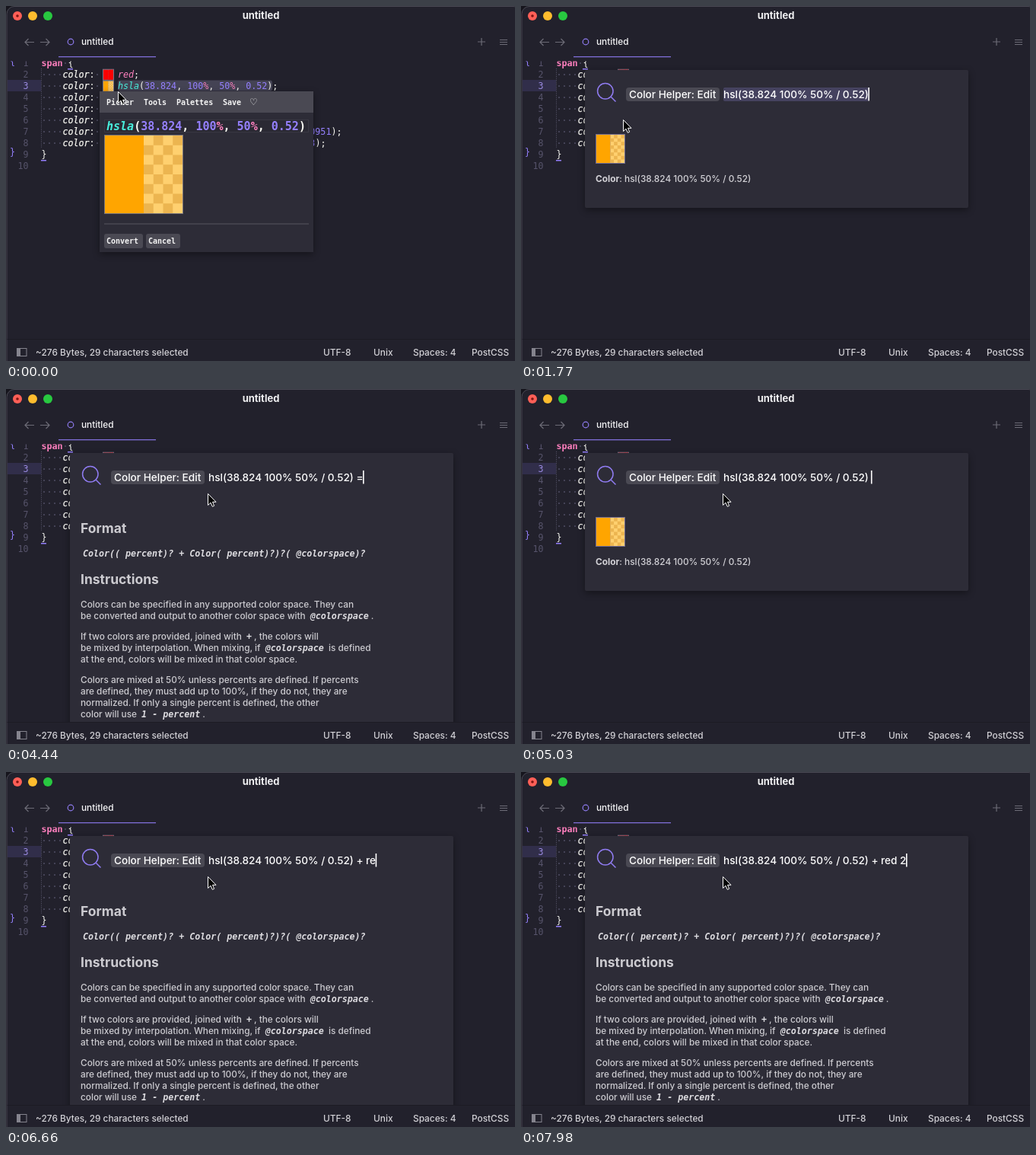
An HTML page that plays this animation: 669 px wide and 466 px high, repeating every 8000 ms.

```html
<!DOCTYPE html>
<html lang="en">
<head>
<meta charset="utf-8">
<title>Color editor</title>
<style>
  html, body { margin: 0; width: 100%; height: 100%; overflow: hidden; background: #16151d; }
  svg { display: block; width: 669px; height: 466px; }
  text { white-space: pre; font: 500 11.85px Inter, sans-serif; fill: #d2d1d6; }
  .mono, .mono tspan { font-family: "DejaVu Sans Mono", monospace; }
  .code, .num { font-weight: 400; font-size: 11.65px; }
  .code { fill: #f8f8f2; }
  .num { fill: #56536a; text-anchor: end; }
  .dot { fill: #55536a; }
  .fn { fill: #48eedc; font-style: italic; }
  .key { fill: #ff80bf; font-style: italic; }
  .val { fill: #9580ff; }
  .pct, .tag { fill: #ff80bf; }
  .tag { font-weight: 700; }
  .prop { font-style: italic; stroke: #f8f8f2; stroke-width: .25; }
  .menu { font-size: 10px; font-weight: 700; fill: #f4f4f4; }
  .heart { font: 12px "DejaVu Sans", sans-serif; fill: #f4f4f4; }
  .big { font-size: 15px; font-weight: 700; fill: #f8f8f2; }
  .input { font-size: 13.6px; fill: #fff; }
  .head { font-size: 17.5px; font-weight: 700; fill: #cccbd0; }
  .help { font-size: 11.8px; fill: #cccbd0; }
  .help .mono, .format { font-size: 11.65px; font-weight: 700; font-style: italic; fill: #dddce0; }
  .icon { fill: none; stroke: #6c6b76; stroke-width: 1.2; }
  .lens { fill: none; stroke: #8f7bf0; stroke-width: 1.5; }
  .surface { fill: #2d2c37; filter: drop-shadow(0 3px 5px rgba(0, 0, 0, .4)); }
  .raised { fill: #4a4953; }
</style>
</head>
<body>
<svg viewBox="0 0 669 466">
  <defs>
    <clipPath id="view"><rect y="72.5" width="669" height="364.5"/></clipPath>
  </defs>
  <rect x="1" y=".5" width="676" height="480" rx="10" fill="#22212c" stroke="#4a4954"/>

  <circle cx="15" cy="13" r="6" fill="#ff5f57"/>
  <circle cx="15" cy="13" r="1.8" fill="#7d1512"/>
  <circle cx="35" cy="13" r="6" fill="#febc2e"/>
  <circle cx="55" cy="13" r="6" fill="#28c840"/>
  <text x="335" y="17" text-anchor="middle" style="font-size:13px;font-weight:700;fill:#f0f0f2">untitled</text>
  <path class="icon" d="M37 47.500H25M29.500 43L25 47.500l4.500 4.500M45 47.500h12M52.500 43L57 47.500l-4.500 4.500"/>
  <circle cx="85" cy="47" r="3.800" fill="none" stroke="#8f7bf0" stroke-width="1.2"/>
  <text x="99" y="51" style="fill:#f4f4f6">untitled</text>
  <rect x="69" y="66" width="128" height="1.300" fill="#7f6ed6"/>
  <path class="icon" d="M620 47h10M625 42v10M649 44.500h10M649 47.500h10M649 50.500h10"/>

  <g clip-path="url(#view)">
    <g id="editor"></g>
    <g id="colorPopup"></g>
    <g id="toolPopup">
      <rect class="surface" x="123" y="112" width="45" height="57"/>
      <rect class="raised" x="123" y="112" width="45" height="28"/>
      <text class="mono menu" x="132" y="130">Back</text>
      <text class="mono menu" x="132" y="157">Edit</text>
    </g>
    <g id="panel">
      <rect id="sheet" class="surface" x="84" y="84" width="504" height="181" rx="2"/>
      <path class="lens" d="M118.200 119.200L124.500 125.500"/>
      <circle class="lens" cx="110.800" cy="111.800" r="10.200"/>
      <rect class="raised" x="138" y="107" width="123" height="18" rx="4"/>
      <text class="input" x="142" y="121">Color Helper: Edit</text>
      <rect id="selection" x="266" y="107" height="18" rx="2" fill="#45425f"/>
      <text class="input" id="input" x="266" y="121"></text>
      <rect id="caret" y="107" width="1.600" height="17.500" fill="#fff"/>
      <g id="preview">
        <g id="baseSwatch"></g>
        <g id="mixSwatch"></g>
        <text x="98" y="231"><tspan font-weight="700">Color</tspan>: <tspan id="result"></tspan></text>
      </g>
      <g id="help"></g>
    </g>
  </g>

  <rect x="1.500" y="437" width="668" height="1" fill="#1c1b24"/>
  <rect x="14.500" y="449.500" width="12.500" height="10" fill="none" stroke="#85848e"/>
  <rect x="15" y="450" width="4" height="9" fill="#85848e"/>
  <text x="39" y="459">~276 Bytes, 29 characters selected</text>
  <text x="417" y="459">UTF-8</text>
  <text x="483" y="459">Unix</text>
  <text x="535" y="459">Spaces: 4</text>
  <text x="612" y="459">PostCSS</text>

  <path id="pointer" d="M.5 .5V15.500L4 12.200L6.300 17.300L8.600 16.300L6.500 11.300H11Z"
        fill="#000" stroke="#fff" stroke-linejoin="round"/>
</svg>
<script>
const $ = id => document.getElementById(id);
const LOOP = 8000;
const ORANGE = ['#ffa500', '#ffd06f', '#ecb550'];
const MIXED = ['#ff3800', '#ff6c42', '#f1562c'];
const BASE = 'hsl(38.824 100% 50% / 0.52)';
const MIX_RESULT = 'hsl(13.282 100% 50% / 0.76)';
const HSLA = 'hsla(38.824, 100%, 50%, 0.52)';

const span = (cls, s) => `<tspan class="${cls}">${s}</tspan>`;
const text = (cls, x, y, s) => `<text class="${cls}" x="${x}" y="${y}">${s}</text>`;
const rect = (x, y, w, h, extra) => `<rect x="${x}" y="${y}" width="${w}" height="${h}" ${extra}/>`;

// Left half opaque, right half over a checkerboard.
function swatch(x, y, size, [solid, light, dark], border) {
  const inner = size - 2, half = inner / 2, cell = inner / 8;
  let cells = '';
  for (let row = 0; row < 8; row++)
    for (let col = (row + 1) % 2; col < 4; col += 2)
      cells += `M${x + 1 + half + col * cell} ${y + 1 + row * cell}h${cell}v${cell}h${-cell}z`;
  return rect(x, y, size, size, `fill="${border}"`) +
    rect(x + 1, y + 1, half, inner, `fill="${solid}"`) +
    rect(x + 1 + half, y + 1, half, inner, `fill="${light}"`) +
    `<path d="${cells}" fill="${dark}"/>`;
}

function highlight(value) {
  return value.replace(/(#\w+)|([a-z][\w-]*)|([\d.]+)|(%)/g, (s, hex, word, number) =>
    span(hex || number ? 'val' : word ? (word === 'red' ? 'key' : 'fn') : 'pct', s));
}

function buildEditor() {
  const lineY = n => 64 + n * 15;
  const plain = color => [color, color, color];
  const rows = [
    ['red', plain('#f00')],
    [HSLA, ORANGE],
    ['#663399', plain('#639')],
    ['rgb(255 0 0 / 0.5)', ['#f00', '#ff8a8a', '#f06a6a']],
    ['hwb(120 0% 0%)', plain('#0f0')],
    ['color(display-p3 0.91749 0.20029 0.10951)', plain('#ff2016')],
    ['lch(54.291% 106.8390 40.8526 / 0.8833)', ['#f00', '#ff2a2a', '#f52020']]
  ];
  let out = rect(2, 97, 44, 15, 'fill="#312e4a"') +
    rect(147, 97.5, 203, 14, 'rx="3" fill="#444354"') +
    '<path d="M46.500 82V187" stroke="#56546a" stroke-dasharray="1 1.500"/>';
  for (let n = 1; n <= 10; n++)
    out += `<text class="mono num" x="29.500" y="${lineY(n)}" ${n === 3 ? 'style="fill:#9a8ae0"' : ''}>${n}</text>`;
  out += text('mono code', 46.5, lineY(1), span('tag', 'span') + span('dot', '·') + '{');
  rows.forEach(([value, colors], i) => {
    const y = lineY(i + 2);
    out += text('mono code', 46.5, y, span('dot', '····') + span('prop', 'color') + ':' + span('dot', '·')) +
      swatch(127, y - 11.3, 15, colors, '#77758a') +
      text('mono code', 147, y, highlight(value) + ';');
  });
  out += text('mono code', 46.5, lineY(9), '}') +
    rect(81, 82, 7, 1.5, 'fill="#9580ff"') + rect(46, 202, 7, 1.5, 'fill="#9580ff"') +
    text('mono code', 5, 77, span('val', '{')) + text('mono code', 5, 196, span('val', '}'));
  $('editor').innerHTML = out;
}

function buildColorPopup() {
  const menu = [['Picker', 132], ['Tools', 181], ['Palettes', 224], ['Save', 285]];
  const buttons = [['Convert', 129, 51], ['Cancel', 184, 45]];
  $('colorPopup').innerHTML =
    rect(123, 112, 281, 211, 'class="surface"') +
    rect(123, 112, 281, 28, 'class="raised"') +
    menu.map(([label, x]) => text('mono menu', x, 130, label)).join('') +
    text('heart', 320, 130, '♡') +
    rect(129.5, 149.5, 268, 16, 'fill="#2a2933" stroke="#393843"') +
    text('mono big', 132, 163, highlight(HSLA)) +
    swatch(129, 169, 104, ORANGE, '#77747c') +
    rect(129, 285.5, 269, 1, 'fill="#585761"') +
    buttons.map(([label, x, w]) =>
      rect(x, 299, w, 19, 'rx="3" class="raised"') + text('mono menu', x + 3, 311.5, label)).join('');
}

function buildHelp() {
  const code = s => `<tspan class="mono" dx="3">${s}</tspan><tspan dx="3">`;
  const lines = [
    [287, 'Colors can be specified in any supported color space. They can'],
    [302, `be converted and output to another color space with ${code('@colorspace')}.</tspan>`],
    [329, `If two colors are provided, joined with ${code('+')}, the colors will</tspan>`],
    [344, `be mixed by interpolation. When mixing, if ${code('@colorspace')} is defined</tspan>`],
    [359, 'at the end, colors will be mixed in that color space.'],
    [386, 'Colors are mixed at 50% unless percents are defined. If percents'],
    [401, 'are defined, they must add up to 100%, if they do not, they are'],
    [416, 'normalized. If only a single percent is defined, the other'],
    [431, `color will use ${code('1 - percent')}.</tspan>`]
  ];
  $('help').innerHTML = text('head', 98, 189, 'Format') +
    text('mono format', 101, 220, 'Color(( percent)? + Color( percent)?)?( @colorspace)?') +
    text('head', 98, 256, 'Instructions') +
    lines.map(([y, s]) => text('help', 98, y, s)).join('');
}

const pointerPath = [
  [0, 147, 112], [150, 152, 116], [300, 168, 121], [440, 182, 124], [590, 189, 126],
  [890, 176, 132], [1030, 157, 141], [1180, 144, 147], [1330, 138, 149], [1480, 134, 149],
  [2220, 150, 148], [2370, 190, 144], [2520, 232, 140], [2660, 257, 138], [2810, 265, 137]
];
const typing = [
  [0, ''], [3700, ' '], [4440, ' ='], [4730, ' '], [5470, ' +'], [6070, ' + '], [6510, ' + r'],
  [6660, ' + re'], [6950, ' + red'], [7400, ' + red '], [7550, ' + red 2']
];
const blink = [
  [0, 1], [3400, .5], [3550, 0], [3700, 1], [3850, .5], [3990, 0], [4140, 1],
  [5920, .5], [6070, 1], [7690, .4], [7980, 1]
];

const latest = (track, t) => track.findLast(([start]) => start <= t);
const show = (id, on) => $(id).setAttribute('display', on ? 'inline' : 'none');

function render(t) {
  const [, x, y] = latest(pointerPath, t);
  $('pointer').setAttribute('transform', `translate(${x} ${y})`);
  show('colorPopup', t < 740);
  show('toolPopup', t >= 740 && t < 1480);
  show('panel', t >= 1770);
  if (t < 1770) return;

  const typed = latest(typing, t)[1];
  const mixed = typed.trim() === '+ red';
  const valid = mixed || !typed.trim();
  $('input').textContent = BASE + typed;
  const width = $('input').getComputedTextLength();
  $('selection').setAttribute('width', width);
  show('selection', t < 2960);
  $('caret').setAttribute('x', 266 + width - .5);
  $('caret').setAttribute('opacity', latest(blink, t)[1]);
  $('sheet').setAttribute('height', valid ? 181 : 370);
  show('preview', valid);
  show('help', !valid);
  show('baseSwatch', !mixed);
  show('mixSwatch', mixed);
  $('result').textContent = mixed ? MIX_RESULT : BASE;
}

buildEditor();
buildColorPopup();
buildHelp();
$('baseSwatch').innerHTML = swatch(98, 168, 39, ORANGE, '#716d94');
$('mixSwatch').innerHTML = swatch(98, 168, 39, MIXED, '#716d94');

const begin = performance.now();
function tick() {
  render((performance.now() - begin) % LOOP);
  requestAnimationFrame(tick);
}
tick();
</script>
</body>
</html>
```
